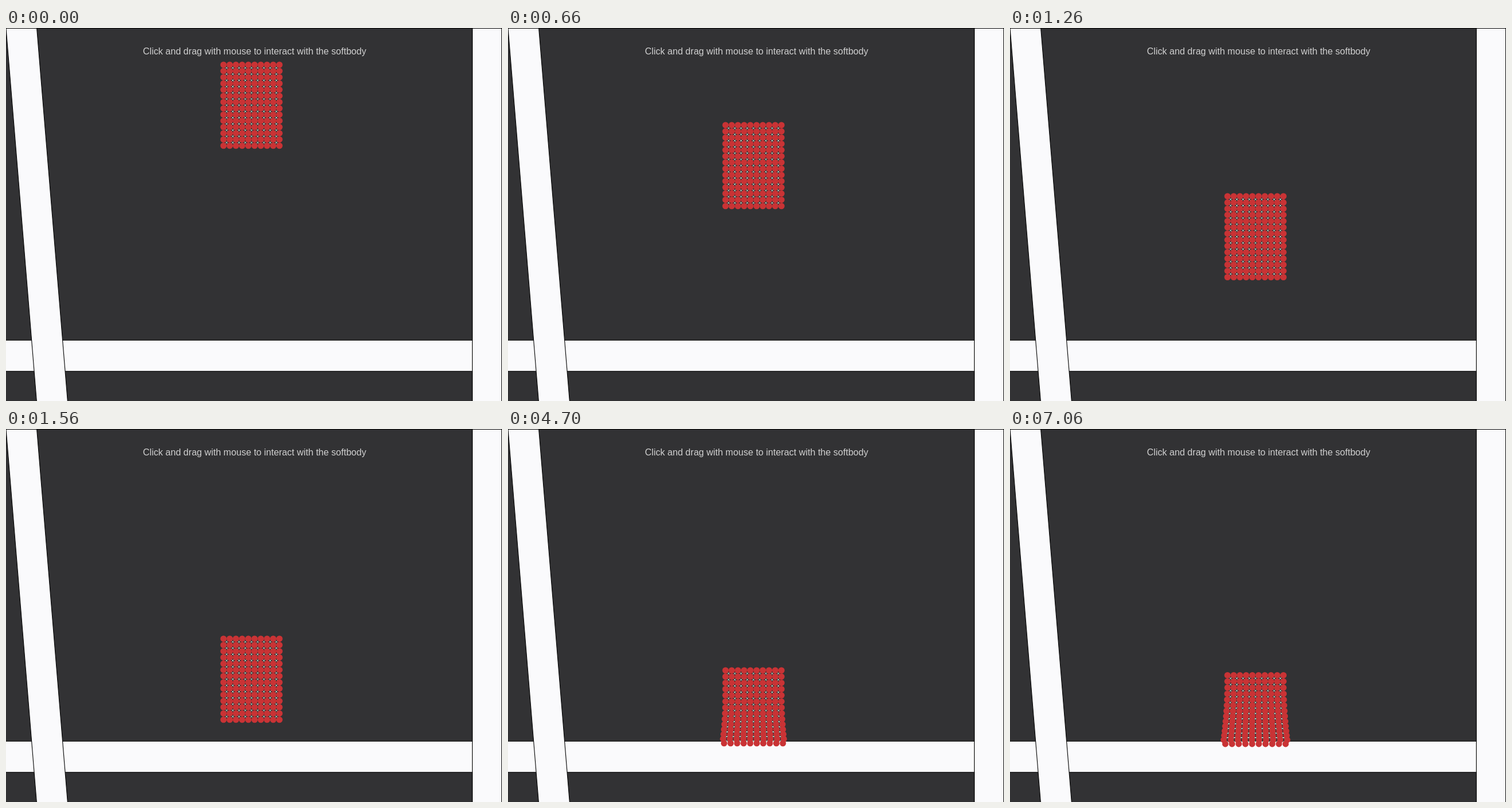
An HTML page with a canvas for the animation above (8000 ms loop, 864 by 649 pixels).

```html
<!DOCTYPE html>
<html lang="en">
<head>
<meta charset="utf-8">
<title>Softbody</title>
<style>
  html, body { margin: 0; width: 100%; height: 100%; overflow: hidden; background: #323234; }
  canvas { display: block; }
</style>
</head>
<body>
<canvas id="stage" width="864" height="649"></canvas>
<script>
const ctx = document.getElementById("stage").getContext("2d");
const WIDTH = 864, HEIGHT = 649, LOOP = 8000;
const COLS = 10, ROWS = 14, GAP = 10.83, RADIUS = 5.5;
const CENTER_X = 427.6, TOP_Y = 64;

// On impact the simulation lags: these are the moments of its last steps.
const SLOW_STEPS = [1700, 1830, 2230, 2900, 3730, 4700, 5830, 7060];

function dropAt(ms) {
  const slow = SLOW_STEPS.filter(moment => moment <= ms).length;
  if (slow) return 335 + 4.2 * (slow - 1);
  // Three steps per 100 ms, at 0, 30 and 60.
  const step = Math.floor(ms / 100) * 3 + Math.min(2, Math.floor(ms % 100 / 30));
  const seconds = step / 30;
  return 131.8 * seconds + 38.5 * seconds ** 2;
}

// The lower rows are squeezed upwards and bulge sideways.
function nodeAt(col, row, drop) {
  const squeeze = Math.max(0, 0.87 * (drop - 340));
  const fromFloor = ROWS - 1 - row;
  const strain = Math.max(0, 1 - fromFloor / (2.6 + 0.4 * squeeze));
  const bulge = squeeze / 2.8 * strain ** 1.5 * (fromFloor ? 1 : 0.5);
  const side = col / (COLS - 1) * 2 - 1;
  return [
    CENTER_X + side * (GAP * (COLS - 1) / 2 + bulge),
    TOP_Y + drop + row * GAP - squeeze * strain ** 2
  ];
}

function wall(...points) {
  ctx.beginPath();
  points.forEach(point => ctx.lineTo(...point));
  ctx.closePath();
  ctx.fillStyle = "#fafafc";
  ctx.fill();
  ctx.strokeStyle = "#000";
  ctx.lineWidth = 1.1;
  ctx.stroke();
}

function drawScene() {
  ctx.fillStyle = "#323234";
  ctx.fillRect(0, 0, WIDTH, HEIGHT);
  wall([-5, 543.3], [820, 543.3], [820, 597.4], [-5, 597.4]);
  wall([0, 0], [53.6, 0], [107.4, HEIGHT + 1], [53.4, HEIGHT + 1]);
  wall([812.4, -5], [863.6, -5], [863.6, 655], [812.4, 655]);
  ctx.fillStyle = "#000";
  ctx.fillRect(0, 0, WIDTH, 1);
  ctx.fillStyle = "#d0d0d0";
  ctx.font = "16.1px 'Liberation Sans', sans-serif";
  ctx.textAlign = "center";
  ctx.fillText("Click and drag with mouse to interact with the softbody", 433, 46);
}

function drawBody(drop) {
  const node = (col, row) => nodeAt(col, row, drop);

  ctx.beginPath();
  for (let row = 1; row < ROWS; row++) {
    for (let col = 1; col < COLS; col++) {
      ctx.moveTo(...node(col - 1, row - 1));
      ctx.lineTo(...node(col, row));
      ctx.moveTo(...node(col, row - 1));
      ctx.lineTo(...node(col - 1, row));
    }
  }
  ctx.strokeStyle = "#d5e6da";
  ctx.lineWidth = 1;
  ctx.stroke();

  ctx.fillStyle = "#c93335";
  for (let row = 0; row < ROWS; row++) {
    for (let col = 0; col < COLS; col++) {
      ctx.beginPath();
      ctx.arc(...node(col, row), RADIUS, 0, Math.PI * 2);
      ctx.fill();
    }
  }
}

function frame() {
  drawScene();
  drawBody(dropAt(performance.now() % LOOP));
  requestAnimationFrame(frame);
}
frame();
</script>
</body>
</html>
```
